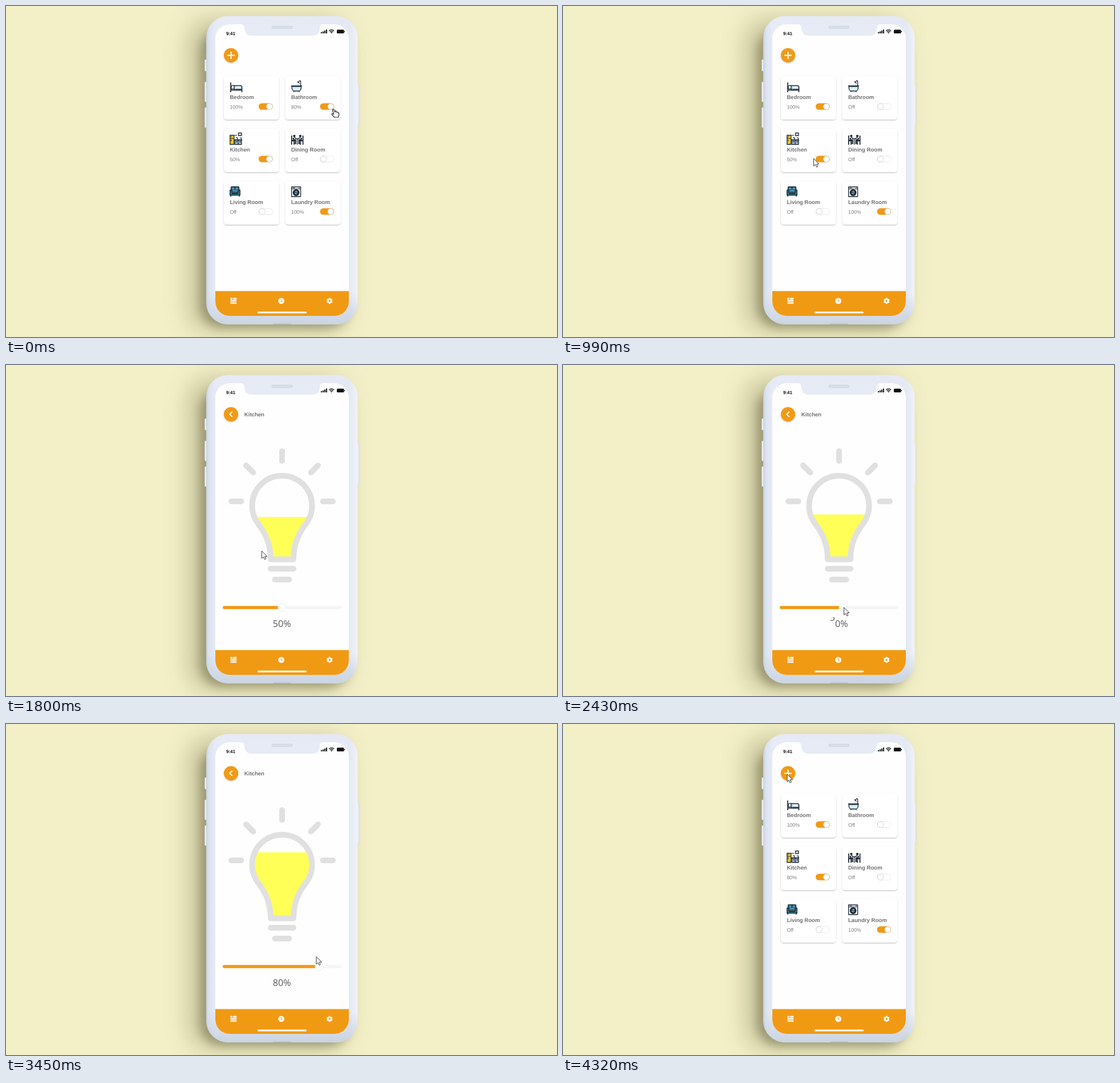
These frames come from a looping animation (966x580 px, 4350 ms). An HTML page:

```html
<!DOCTYPE html>
<html lang="en">
<head>
<meta charset="utf-8">
<title>Smart home lights</title>
<style>
  html, body { margin: 0; width: 100%; height: 100%; overflow: hidden; background: #f3f0c8; }
  svg { display: block; width: 966px; height: 580px; }
  text { font-family: "Liberation Sans", Arial, sans-serif; text-rendering: geometricPrecision; }
  .title { font-size: 9.6px; font-weight: 700; fill: #717171; }
  .level { font-size: 8.9px; fill: #7d7d7d; }
  .percent { font: 16.2px "Open Sans", "Noto Sans", sans-serif; fill: #585858; }
</style>
</head>
<body>
<svg viewBox="0 0 966 580">
  <defs>
    <linearGradient id="body" x1="0" x2="1" y1="0" y2="0">
      <stop offset="0" stop-color="#c9d2e0"/><stop offset=".018" stop-color="#dce3ef"/>
      <stop offset=".06" stop-color="#e6ebf6"/><stop offset=".95" stop-color="#e4e9f3"/>
      <stop offset="1" stop-color="#f0f3f9"/>
    </linearGradient>
    <linearGradient id="foot" x1="0" x2="0" y1="0" y2="1">
      <stop offset=".9" stop-color="#c4cedc" stop-opacity="0"/><stop offset="1" stop-color="#c4cedc" stop-opacity=".8"/>
    </linearGradient>
    <filter id="wide" x="-40%" y="-20%" width="180%" height="140%"><feGaussianBlur stdDeviation="20"/></filter>
    <filter id="tight" x="-20%" y="-20%" width="140%" height="140%"><feGaussianBlur stdDeviation="8"/></filter>
    <filter id="lift" x="-20%" y="-20%" width="140%" height="150%">
      <feDropShadow dx="0" dy="1.2" stdDeviation="1.3" flood-color="#000" flood-opacity=".24"/>
    </filter>
    <clipPath id="screenClip"><rect x="367" y="32" width="234" height="511" rx="25"/></clipPath>
    <clipPath id="digitClip"><rect x="464" y="442" width="13.2" height="21.5"/></clipPath>
    <path id="bulb" d="M464 340.5C464 313 455 295.5 442 278A52.5 52.5 0 1 1 526 278C513 295.5 504 313 504 340.5Z"/>
    <clipPath id="bulbClip"><use href="#bulb"/></clipPath>
  </defs>

  <rect width="966" height="580" fill="#f3f0c8"/>
  <rect x="318" y="22" width="280" height="550" rx="40" fill="#8d8a62" opacity=".42" filter="url(#wide)"/>
  <rect x="340" y="42" width="264" height="522" rx="38" fill="#77744f" opacity=".55" filter="url(#tight)"/>

  <g fill="#e9edf5" stroke="#c9d1dd" stroke-width=".6">
    <rect x="348.5" y="94" width="4" height="20" rx="1"/>
    <rect x="348.5" y="133" width="4" height="35" rx="1"/>
    <rect x="348.5" y="178" width="4" height="35" rx="1"/>
    <rect x="615" y="138" width="4" height="71" rx="1"/>
  </g>
  <rect x="351" y="17.5" width="265.5" height="540.5" rx="38" fill="url(#body)"/>
  <rect x="351" y="17.5" width="265.5" height="540.5" rx="38" fill="url(#foot)"/>
  <path d="M468 557H500" stroke="#b3bdcb" stroke-width="1.5"/>
  <rect x="367" y="32" width="234" height="511" rx="25" fill="#fdfefd"/>
  <path d="M411 31.5Q418 32 418 39Q419 52 431 52H537Q549 52 550 39Q550 32 557 31.5Z" fill="#e6ebf5"/>
  <rect x="466" y="35.3" width="36" height="4" rx="2" fill="#dce1eb" stroke="#c2c9d5" stroke-width=".7"/>

  <text x="386" y="50.5" font-size="8" font-weight="700" fill="#111">9:41</text>
  <g fill="#111">
    <path d="M552 45.7h2v2.3h-2zM555 44.5h2v3.5h-2zM558 43h2v5h-2zM561 41.3h2v6.7h-2z"/>
    <path d="M569 46.3L570.7 48.3L572.4 46.3Q570.7 45 569 46.3Z"/>
    <path d="M566.2 43.6Q570.7 39.6 575.2 43.6M567.8 45.4Q570.7 42.8 573.6 45.4" fill="none" stroke="#111" stroke-width="1.3"/>
    <rect x="580" y="41.6" width="12.6" height="6.4" rx="1.5"/><rect x="593.1" y="43.6" width="1.1" height="2.4" rx=".5"/>
  </g>

  <g id="home"></g>

  <g id="detail">
    <path d="M367 60H601V499H367Z" fill="#fdfefd"/>
    <circle cx="394.5" cy="86.3" r="12.6" fill="#f09a14" filter="url(#lift)"/>
    <path d="M396.8 81.8L392.3 86.3L396.8 90.8" fill="none" stroke="#fff" stroke-width="1.9"/>
    <text class="title" x="417.8" y="89.8">Kitchen</text>
    <rect id="light" x="426" width="116" fill="#ffff58" clip-path="url(#bulbClip)"/>
    <g fill="none" stroke="#e0e0e0" stroke-width="10" stroke-linecap="round" stroke-linejoin="round">
      <use href="#bulb"/>
      <path d="M464 357H504M471.5 376H496.5M484 151V168M395 239H412.5M555.5 239H573M421 176L433.5 188.5M547 176L534.5 188.5"/>
    </g>
    <rect x="380" y="422.3" width="208" height="5.4" rx="2.7" fill="#f5f5f5"/>
    <rect id="filled" x="380" y="422.3" height="5.4" rx="2.7" fill="#f09a14"/>
    <circle id="thumb" cy="425" r="7.2" fill="#fff" stroke="#e4e4e4" stroke-width=".8"/>
    <g clip-path="url(#digitClip)"><g id="reel"></g></g>
    <text class="percent" x="477" y="459">0%</text>
  </g>

  <g clip-path="url(#screenClip)">
    <rect x="367" y="499.5" width="234" height="44" fill="#f09a14"/>
    <path d="M393.5 511.5h3.6v3h-3.6zM398.3 511.5h5.9v3h-5.9zM393.5 515.6h10.7v2.4h-10.7zM393.5 519.2h10.7v2.6h-10.7z" fill="#fff"/>
    <circle cx="482.6" cy="516.8" r="5.3" fill="#fff"/>
    <path d="M482.4 513.3V517L485 518.6" fill="none" stroke="#f09a14" stroke-width="1.1"/>
    <g transform="translate(567.3 516.8)">
      <circle r="4" fill="#fff"/>
      <path d="M0-5.3V5.3M-4.6-2.65L4.6 2.65M-4.6 2.65L4.6-2.65" stroke="#fff" stroke-width="2.6"/>
      <circle r="1.8" fill="#f09a14"/>
    </g>
    <rect x="441" y="535.4" width="86" height="3.2" rx="1.6" fill="#fff"/>
  </g>

  <path id="arrow" d="M0 0V13.2L3 10.4L5.1 15L7.3 14L5.2 9.6H9.4Z" fill="#fff" stroke="#3a3a3a" stroke-width="1" stroke-linejoin="round"/>
  <path id="hand" d="M-1.6 1Q-.6-1 1 .6L2.7 5Q4-.1 5.3 5.2Q6.6 3.6 7.6 5.7Q9.3 4.8 9.6 7.2L9.7 10.2L8.4 14H1.6L-2.7 9.2Q-3.6 7.2-1 7.8L.6 8.8Z" fill="#fff" stroke="#222" stroke-width="1.2" stroke-linejoin="round"/>
</svg>

<script>
const LOOP = 4350;
const ORANGE = '#f09a14';
const get = id => document.getElementById(id);

// Icons are drawn relative to the top left corner of their card.
const INK = 'stroke="#1d2733" stroke-width="1.3" stroke-linejoin="round"';
const icons = {
  bed: `<g ${INK} fill="none">
    <path d="M12 11V28M12 24.5H31.5V28M31.5 24V18.5" stroke-width="1.7"/>
    <path d="M13 18Q14 15.5 18 16.5V22.5H13Z" fill="#fff"/>
    <path d="M18 16.5H29Q31.3 16.5 31.3 19V23H18Z" fill="#e7f2fa"/><path d="M20.5 17V23" stroke="#8fc3dd"/></g>`,
  bath: `<g ${INK} fill="none">
    <path d="M11.5 18H28Q28 26 24 26H15.5Q11.5 26 11.5 18Z" fill="#d5edf6"/>
    <path d="M10.2 17H29.3M15 26.5V28M24.5 26.5V28M27 17V9.5Q27 7.5 24.8 8.2L22.8 10.5M21 9.5L25 12.5"/>
    <path d="M21 13.5L19.8 15M23.5 14L23 15.5" stroke="#5db4d4" stroke-width="1"/></g>`,
  kitchen: `<g ${INK} fill="none">
    <path d="M10.8 11.5H17.8V27.5H10.8Z" fill="#f6c41d"/><path d="M11 17H17.5M12.8 13.3V15M12.8 19V22" stroke-width="1"/>
    <path d="M19 20H31V27.5H19Z" fill="#a9c6d4"/><path d="M18 19.5H32M25 20V27.5M20.5 23H23.5M27 23H30"/>
    <path d="M25.5 7.5H31V12H25.5Z" fill="#dfe6ea"/><path d="M18.5 11.5H23M21 15.8H24V19M27.5 16H30.5V19" stroke-width="1.2"/></g>`,
  dining: `<g ${INK} fill="none" stroke="#1c2740">
    <path d="M11.2 12V28M11.2 21H15.5V28M31 12V28M31 21H26.7V28" stroke-width="1.8"/>
    <path d="M14.3 16V20H18V27M27.9 16V20H24.2V27" stroke-width="2.3"/>
    <path d="M17 17.5H25.2M21.1 17.5V28M15.5 15L18.5 16.5M26.7 15L23.7 16.5"/>
    <circle cx="15.8" cy="12.8" r="1.5" fill="#1c2740"/><circle cx="26.4" cy="12.8" r="1.5" fill="#1c2740"/></g>`,
  sofa: `<g ${INK} fill="#2c7895">
    <path d="M12.5 18V11Q12.5 9.7 14 9.7H25Q26.5 9.7 26.5 11V18Z"/>
    <path d="M10.7 15.5H14V20H25V15.5H28.3V24.5H10.7Z"/>
    <path d="M12.2 25V27.3M26.8 25V27.3M14 21.5H25M19.5 10V15" stroke-width="1.4"/>
    <path d="M15 13H18.5M20.5 13H24M15 17H24" stroke="#83c2d8" stroke-width="1.2"/></g>`,
  washer: `<g ${INK}>
    <path d="M11 10H27V27H11Z" fill="#f4f7f8"/><path d="M11 13.6H27" stroke-width="1"/>
    <path d="M12.7 11.8H17M23.5 11.8H25.5" stroke-width="1"/>
    <circle cx="19" cy="20" r="5.2" fill="#1d2733"/><circle cx="19" cy="20" r="3.4" fill="#75bfd2"/>
    <path d="M16 20Q17.5 18.8 19 20T22 20" fill="none"/></g>`
};

const rooms = [
  ['Bedroom', '100%', 'bed'], ['Bathroom', '80%', 'bath'],
  ['Kitchen', '50%', 'kitchen'], ['Dining Room', 'Off', 'dining'],
  ['Living Room', 'Off', 'sofa'], ['Laundry Room', '100%', 'washer']
];

const card = ([name, level, icon], i) => `
  <g id="${icon}" transform="translate(${382 + i % 2 * 107.6} ${123 + (i >> 1) * 92})">
    <rect width="96.5" height="76" rx="5" fill="#fff" filter="url(#lift)"/>
    ${icons[icon]}
    <text class="title" x="10.4" y="40.3">${name}</text>
    <text class="level" x="10.4" y="57">${level}</text>
    <rect x="61" y="47.8" width="24.5" height="10.8" rx="5.4" fill="#fff" stroke="#e3e3e3" stroke-width=".8"/>
    <rect class="on" x="61" y="47.6" width="24.5" height="11.2" rx="5.6" fill="${ORANGE}" opacity="${+(level !== 'Off')}"/>
    <circle class="knob" cx="${level === 'Off' ? 67 : 79.7}" cy="53.2" r="5.3" fill="#fff" stroke="#c9c9c9" stroke-width=".8"/>
  </g>`;

get('home').innerHTML = `
  <circle cx="394.5" cy="86.3" r="12.6" fill="${ORANGE}" filter="url(#lift)"/>
  <path d="M388 86.5H401.2M394.6 79.9V93.1" stroke="#fff" stroke-width="2.1"/>` + rooms.map(card).join('');

const DIGIT_STEP = 33;
get('reel').innerHTML = [5, 6, 7, 8].map(d =>
  `<text class="percent" x="467.8" y="${459 + (d - 5) * DIGIT_STEP}">${d}</text>`).join('');

const part = (room, selector) => document.querySelector(`#${room} ${selector}`);
const bathOn = part('bath', '.on'), bathKnob = part('bath', '.knob');
const bathLevel = part('bath', '.level'), kitchenLevel = part('kitchen', '.level');

const ease = p => p < .5 ? 2 * p * p : 1 - 2 * (1 - p) ** 2;
const span = (t, from, to) => ease(Math.min(1, Math.max(0, (t - from) / (to - from))));
const set = (el, attrs) => { for (const k in attrs) el.setAttribute(k, attrs[k]); };

// Cursor legs: start time, end time, destination.
const legs = [
  [270, 1160, 429, 274],
  [1560, 2140, 485, 424],
  [2190, 3226, 555, 431],
  [3300, 4119, 393, 88]
];

function cursorAt(t) {
  let x = 574, y = 181;
  for (const [from, to, nx, ny] of legs) {
    const p = span(t, from, to);
    x += (nx - x) * p;
    y += (ny - y) * p;
  }
  return [x, y];
}

function render(t) {
  const off = span(t, 90, 270);
  set(bathOn, { opacity: 1 - off });
  set(bathKnob, { cx: 79.7 - 12.7 * off });
  bathLevel.textContent = t < 180 ? '80%' : 'Off';
  kitchenLevel.textContent = t < 3226 ? '50%' : '80%';

  const shown = span(t, 1430, 1690) - span(t, 4140, 4300);
  set(get('detail'), { opacity: shown, display: shown > 0 ? 'inline' : 'none' });

  const level = 5 + 3 * span(t, 2190, 3226);
  const thumbX = 484 + (level - 5) * 21.67;
  const top = 266.4 - (level - 5) * 13.85;
  set(get('thumb'), { cx: thumbX });
  set(get('filled'), { width: thumbX - 382 });
  set(get('light'), { y: top, height: 336 - top });
  set(get('reel'), { transform: `translate(0 ${(5 - level) * DIGIT_STEP})` });

  const place = `translate(${cursorAt(t).join(' ')})`;
  const pointing = t < 360;
  set(get('hand'), { transform: place, display: pointing ? 'inline' : 'none' });
  set(get('arrow'), { transform: place, display: pointing ? 'none' : 'inline' });
}

const start = performance.now();
function frame(now) {
  render(Math.max(0, now - start) % LOOP);
  requestAnimationFrame(frame);
}
render(0);
requestAnimationFrame(frame);
</script>
</body>
</html>
```
